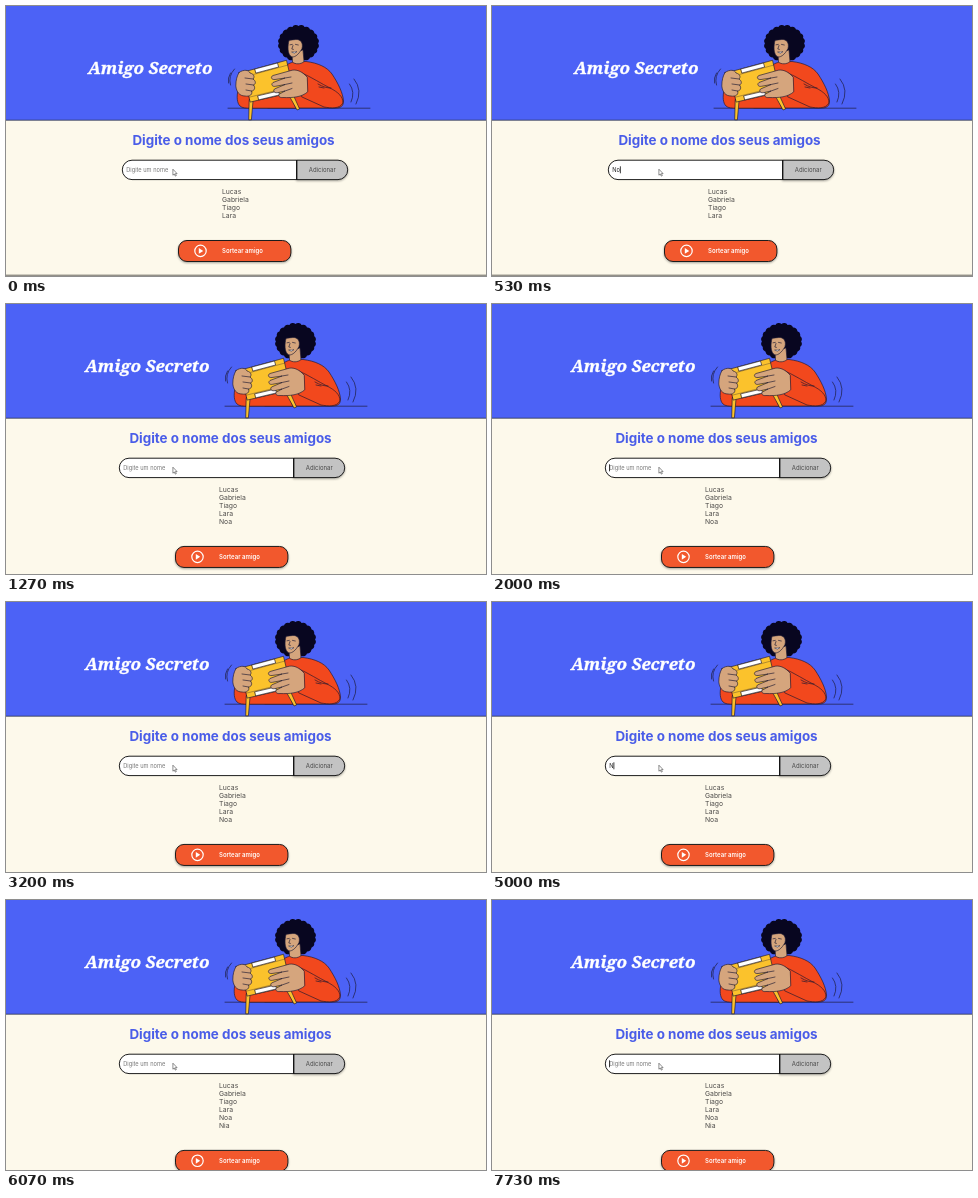
An HTML page that plays this animation: 480 by 270 pixels, repeating every 8 s.

```html
<!DOCTYPE html>
<html lang="pt-BR">
<head>
<meta charset="utf-8">
<title>Amigo Secreto</title>
<style>
html, body { margin: 0; width: 100%; height: 100%; overflow: hidden; background: #fdf9eb; }
svg { display: block; width: 100vw; height: 100vh; }
text { font-family: Inter, sans-serif; white-space: pre; }
.title { font: italic 700 17.1px "Noto Serif", serif; fill: #fff; stroke: #fff; stroke-width: .35; }
.heading { font-size: 13.4px; font-weight: 700; fill: #4a5de8; }
.small { font-size: 6px; }
.row { font-size: 6.8px; fill: #4c4a48; }
.ink { stroke: #1b1830; stroke-width: .65; stroke-linejoin: round; stroke-linecap: round; }
.line { fill: none; }
.skin { fill: #d5a57d; }
.shirt { fill: #f2481d; }
.box { fill: #fbc22c; }
.edge { stroke: #1c1c1c; stroke-width: 1; }
.shade { filter: drop-shadow(0 1.5px 1.2px rgba(0, 0, 0, .35)); }
</style>
</head>
<body>
<svg viewBox="0 0 480 270" preserveAspectRatio="none">
  <rect width="480" height="270" fill="#fdf9eb"/>
  <rect width="480" height="114" fill="#4c62f6"/>
  <path d="M0 114.2H480" stroke="#30395f" stroke-width=".9"/>
  <path id="bottom" d="M0 269.2H480" stroke="#55544f" stroke-width=".9"/>
  <g id="page">
    <text class="title" x="82" y="68.4">Amigo Secreto</text>

    <g id="art">
      <path class="ink line" d="M222 102.2H364"/>
      <path class="ink shirt" d="M276 62C281 58 285 56.5 288 56L300 55.5C312 57 321 61 326 68C332 77 337 87 337.5 95C337.5 100 335 102 329 102H262Z"/>
      <path class="ink shirt" d="M232 84C230.5 91 231 97 234 100C236 102 240 102.2 245 102.2H290L282 84L249 89Z"/>
      <path id="hair" fill="#080620"/>
      <path class="ink skin" d="M286 48L286.5 56C289 58.5 295 58.5 298 55.5L297 44Z"/>
      <path class="ink skin" d="M283 34.5C281.5 40 281.5 47 284.5 50C287.5 53 293 48.5 296 42.5C297.5 37 294.5 33 290 33.5Z"/>
      <path class="ink line" stroke-width=".5" d="M284 38.8L286.3 38.4M289.5 38.4L292.3 39M287 39.5L285.8 43L287.4 43.4"/>
      <path d="M285.6 46Q288.5 48.6 291 45.6Q288.5 46.2 285.6 46Z" fill="#fff" stroke="#17152b" stroke-width=".5"/>
      <path class="ink box" d="M243.2 94L242.7 113.8H245.4L247 95Z"/>
      <path class="ink box" d="M280 84L291 104L293.6 103L285 84Z"/>
      <path class="ink box" d="M237.5 66L280.5 54.3L288 86L244.5 96Z"/>
      <path class="ink line" d="M240 70.5L282 59M244 91L286.5 80.5" stroke-opacity=".5"/>
      <path class="ink" fill="#fff" d="M249 63L271.5 57L272.6 61L250.2 67Z"/>
      <path class="ink" fill="#fff" d="M252 89.8L272.5 85L273.5 88.9L253 93.8Z"/>
      <path class="ink skin" d="M233 66.5C238 63 243 64 244 67C248 68 249 71 247 73C250 75 250 78 247.5 79C250 82 248 85 245.5 85C247 88 244 91 239 90C233.5 90 230.5 86 229.8 80C229.8 74 231 70 233 66.5Z"/>
      <path class="ink line" d="M239 72L247 73M240 78L247.5 79M240 84L245.5 85"/>
      <path class="ink shirt" d="M296 67C305 71 316 78 324 82C332 86 337.5 91 336.8 97C334 103 325 102.2 318 101L296 91Z"/>
      <path class="ink skin" d="M301 71C296 65 290 63 285 64.5L267 69.5C264 71 265.5 74 269 73.5L279 72L267 76.5C264.5 78.5 266.5 81 269.5 80.3L279 78.5L268.5 83C266.5 85.5 269 87.4 272 86.6L279 85L273 88.3C272 90.6 274.5 92 277 91.5C287 92 296 91 301.5 86Z"/>
      <path class="ink line" d="M279 72L285 71M279 78.5L286 77M279 85L286 82.5"/>
      <path class="ink line" d="M312 78C317 81 321 82 325 82M313 81L318 82"/>
      <path class="ink line" d="M228.5 63Q222 70 224.5 79M224.5 67Q221.5 72 222.5 77"/>
      <path class="ink line" d="M343.5 78Q349.5 86 345 96M348 73Q357 84 350 98"/>
    </g>

    <text class="heading" x="126.4" y="139">Digite o nome dos seus amigos</text>
    <g class="shade">
      <path class="edge" fill="#c3c3c3" d="M290.5 154.2H332A9.7 9.7 0 0 1 332 173.6H290.5Z"/>
    </g>
    <path class="edge" fill="#fff" d="M290.5 154.2H126A9.7 9.7 0 0 0 126 173.6H290.5Z"/>
    <path d="M290.7 154V174" stroke="#151515" stroke-width="1.4"/>
    <text class="small" x="302.8" y="166.2" fill="#4a4a4a">Adicionar</text>
    <text class="small" id="field" x="120.2" y="165.8" style="font-size:5.7px"></text>
    <rect id="caret" y="160.3" width=".8" height="7" fill="#111"/>
    <g id="list"></g>

    <g id="draw">
      <rect class="edge shade" x="172.5" y="234.5" width="112.4" height="21" rx="8.5" fill="#f2582d"/>
      <circle cx="194.5" cy="244.9" r="5.7" fill="none" stroke="#fff" stroke-width="1.2"/>
      <path d="M192.8 242V247.8L197.2 244.9Z" fill="#fff"/>
      <text class="small" x="216" y="247.2" fill="#fff" font-weight="600">Sortear amigo</text>
    </g>
  </g>
  <path d="M166.9 163.2V169.2L168.3 168L169.3 170.1L170.3 169.6L169.4 167.6H171.1Z" fill="#fff" stroke="#333" stroke-width=".55"/>
</svg>
<script>
const $ = id => document.getElementById(id);
const LOOP = 8000, BLINK = 532;
const names = ["Lucas", "Gabriela", "Tiago", "Lara", "Noa", "Nia"];
const added = [1265, 6065];
const keys = [
  [0, ""], [65, "N"], [330, "No"], [535, "Noa"], [1265, ""],
  [4995, "N"], [5265, "Ni"], [5465, "Nia"], [6065, ""]
];

// Curly outline: short arcs around an ellipse
function curls(cx, cy, rx, ry, n) {
  const at = i => {
    const a = i / n * Math.PI * 2;
    return (cx + rx * Math.cos(a)).toFixed(1) + " " + (cy + ry * Math.sin(a)).toFixed(1);
  };
  let d = "M" + at(0);
  for (let i = 1; i <= n; i++) d += "A4 4 0 0 1 " + at(i);
  return d + "Z";
}
$("hair").setAttribute("d", curls(292.5, 37.5, 19.6, 17.4, 20));

const rows = names.map((name, i) => {
  const row = document.createElementNS("http://www.w3.org/2000/svg", "text");
  row.setAttribute("class", "row");
  row.setAttribute("x", 216);
  row.setAttribute("y", 187.8 + i * 7.95);
  row.textContent = name;
  $("list").append(row);
  return row;
});

function caretOn(t) {
  const start = t < 4995 ? 535 : 5465;
  if (t < 65) return false;
  if (t < 535 || (t >= 4995 && t < 5465)) return true;
  return Math.floor((t - start) / BLINK) % 2 === 0;
}

function render(t) {
  const extra = added.filter(a => t >= a).length;
  const typed = keys.filter(k => t >= k[0]).pop()[1];
  const field = $("field");
  $("page").setAttribute("transform", `translate(${extra ? -3 : 0} 0)`);
  $("draw").setAttribute("transform", `translate(0 ${extra * 7.95})`);
  $("bottom").style.display = extra ? "none" : "";
  rows.forEach((row, i) => row.style.display = i < 4 + extra ? "" : "none");
  field.textContent = typed || "Digite um nome";
  field.setAttribute("fill", typed ? "#222" : "#777");
  $("caret").setAttribute("x", 120.2 + (typed ? field.getComputedTextLength() : 0));
  $("caret").style.display = caretOn(t) ? "" : "none";
}

const begin = performance.now();
function tick() {
  render((performance.now() - begin) % LOOP);
  requestAnimationFrame(tick);
}
tick();
</script>
</body>
</html>
```
